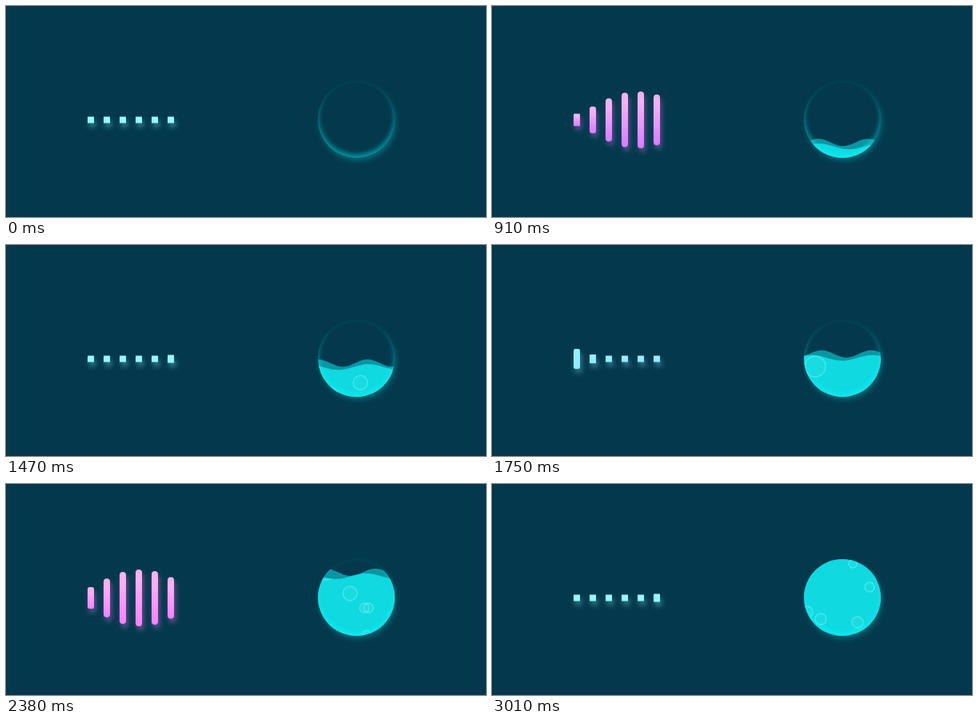
Animation, 600 px wide and 264 px high, one loop 3080 ms. Source, as an HTML page:

```html
<!DOCTYPE html>
<html lang="en">
<head>
<meta charset="utf-8">
<title>Loading bars and filling sphere</title>
<style>
  html, body { margin: 0; width: 100%; height: 100%; overflow: hidden; background: #04394d; }
  svg { display: block; width: 600px; height: 264px; }
</style>
</head>
<body>
<svg id="stage" viewBox="0 0 600 264">
  <defs>
    <linearGradient id="barFill" x1="0" y1="0" x2="0" y2="1">
      <stop id="barTop" offset=".2"/>
      <stop id="barBottom" offset=".95"/>
    </linearGradient>
    <filter id="barGlow" filterUnits="userSpaceOnUse" x="80" y="80" width="160" height="130" color-interpolation-filters="sRGB">
      <feDropShadow id="barShadow" dx="2" dy="5" stdDeviation="3" flood-opacity=".38"/>
    </filter>
    <filter id="soft" filterUnits="userSpaceOnUse" x="370" y="74" width="140" height="140">
      <feGaussianBlur stdDeviation="3"/>
    </filter>
    <clipPath id="ball"><circle cx="438" cy="142" r="48"/></clipPath>
    <clipPath id="liquid"><path id="liquidClip"/></clipPath>
  </defs>
  <rect width="600" height="264" fill="#04394d"/>
  <g id="bars" fill="url(#barFill)" filter="url(#barGlow)"></g>

  <circle cx="440" cy="146" r="48" fill="#08a5b0" opacity=".38" filter="url(#soft)"/>
  <circle cx="438" cy="142" r="48" fill="#04394d"/>
  <g clip-path="url(#ball)">
    <path id="backWave" fill="#0897a3"/>
    <path id="frontWave" fill="#10d9e0"/>
    <g id="bubbles" clip-path="url(#liquid)" fill="#8ff" fill-opacity=".07" stroke="#7df3f3" stroke-opacity=".5" stroke-width="1.4"></g>
    <path d="M370 74H510V214H370Z M390 138a48 48 0 1 0 96 0a48 48 0 1 0 -96 0Z"
      fill="#00ffff" fill-rule="evenodd" opacity=".5" filter="url(#soft)"/>
  </g>
</svg>
<script>
const LOOP = 3080, STEP = 70, BAR_CYCLE = 1540;
const $ = id => document.getElementById(id);

function add(parent, tag, attrs) {
  const el = document.createElementNS('http://www.w3.org/2000/svg', tag);
  set(el, attrs);
  return parent.appendChild(el);
}

function set(el, attrs) {
  for (const key in attrs) el.setAttribute(key, attrs[key]);
}

const clamp = v => Math.max(0, Math.min(1, v));

// cubic-bezier(.42, 0, .58, 1), solved by bisection
function easeInOut(x) {
  let lo = 0, hi = 1, s = .5;
  for (let i = 0; i < 20; i++) {
    s = (lo + hi) / 2;
    const bx = 3 * s * (1 - s) ** 2 * .42 + 3 * s * s * (1 - s) * .58 + s ** 3;
    if (bx < x) lo = s; else hi = s;
  }
  return s * s * (3 - 2 * s);
}

// Each colour stop is [position, r, g, b]
const TOP = [[0, 150, 253, 253], [.27, 150, 240, 255], [.45, 168, 182, 252], [.7, 232, 178, 246], [.9, 255, 175, 240]];
const BOTTOM = [[0, 144, 253, 253], [.27, 140, 235, 255], [.45, 150, 142, 255], [.72, 184, 118, 255], [.9, 250, 130, 255]];

function colorAt(stops, pos) {
  let i = 1;
  while (i < stops.length - 1 && stops[i][0] < pos) i++;
  const a = stops[i - 1], b = stops[i];
  const k = clamp((pos - a[0]) / (b[0] - a[0]));
  return `rgb(${[1, 2, 3].map(c => Math.round(a[c] + (b[c] - a[c]) * k))})`;
}

const bars = Array.from({ length: 6 }, (_, i) => add($('bars'), 'rect', { x: 102 + 20 * i, width: 8 }));

function drawBars(t) {
  const phase = t % BAR_CYCLE;
  bars.forEach((bar, i) => {
    const local = phase - 100 * i;
    const grow = easeInOut(clamp(1 - Math.abs(local - 531) / 500));
    const h = 8 + 63 * grow;
    set(bar, { y: 142.5 - h / 2, height: h, rx: Math.min(4, 8 * grow) });
  });
  const hue = 1 - Math.abs(2 * phase / BAR_CYCLE - 1);
  set($('barTop'), { 'stop-color': colorAt(TOP, hue) });
  set($('barBottom'), { 'stop-color': colorAt(BOTTOM, hue) });
  set($('barShadow'), { 'flood-color': colorAt(BOTTOM, hue) });
}

function wavePath(level, amp, length, crest) {
  let d = 'M388 200';
  for (let x = 388; x <= 488; x += 2) {
    d += `L${x} ${(level - amp * Math.cos(2 * Math.PI * (x - crest) / length)).toFixed(2)}`;
  }
  return d + 'L488 200Z';
}

// Moment at which a bubble is at x, y with radius r
const BUBBLES = [
  [1190, 443, 181, 7], [1190, 450, 179, 9],
  [1750, 404, 152, 13], [1750, 443, 133, 9],
  [2030, 400, 157, 12],
  [2380, 430, 137, 9], [2380, 448, 155, 6], [2380, 453, 155, 6],
  [3010, 451, 100, 5], [3010, 472, 129, 6], [3010, 411, 169, 7], [3010, 457, 173, 7], [3010, 394, 160, 7]
].map(([time, x, y, r]) => ({ time, y, el: add($('bubbles'), 'circle', { cx: x, r }) }));

function drawSphere(t) {
  const level = 208 - .041 * t;
  const drift = t - 2030;
  const front = wavePath(level + 5, 3.5, 76, 422 + .08 * drift);
  set($('backWave'), { d: wavePath(level, 4.5, 62, 434 + .0786 * drift) });
  set($('frontWave'), { d: front });
  set($('liquidClip'), { d: front });
  for (const b of BUBBLES) set(b.el, { cy: b.y - .14 * (t - b.time) });
}

function render(now) {
  const t = Math.floor((now % LOOP) / STEP) * STEP;
  drawBars(t);
  drawSphere(t);
}

const start = performance.now();
function tick() {
  render(performance.now() - start);
  requestAnimationFrame(tick);
}
tick();
</script>
</body>
</html>
```
